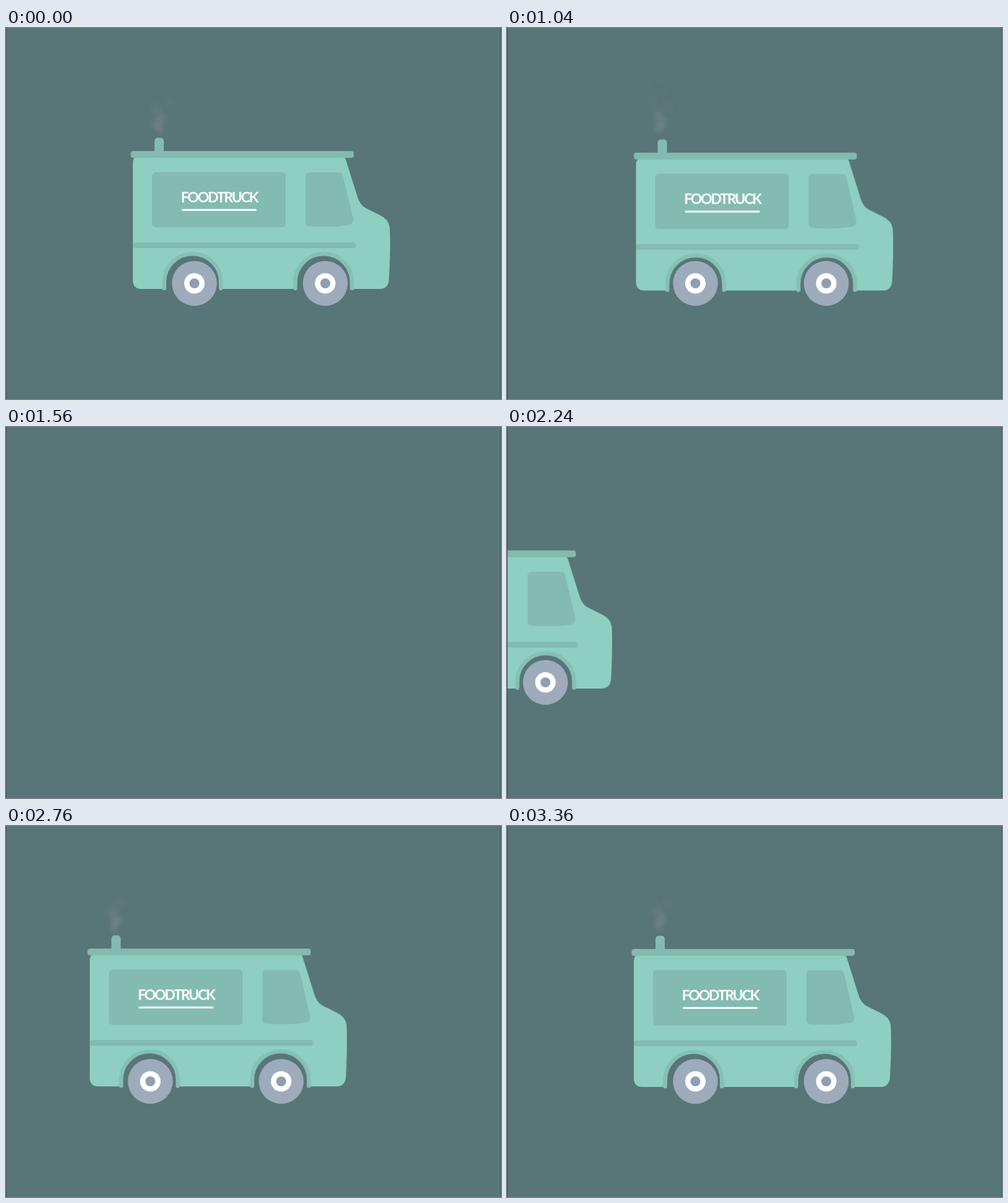
Animation, 800 px wide and 600 px high, one loop 3.4 s. Source, as an HTML page:

```html
<!DOCTYPE html>
<html lang="en">
<head>
<meta charset="utf-8">
<title>Food truck</title>
<style>
  :root { --bg: #587577; --body: #8ecfc2; --trim: #83bbb0; --fender: #86c0b4; --wheel: #9dabba; }
  html, body { margin: 0; width: 100%; height: 100%; overflow: hidden; background: var(--bg); }
  svg { display: block; width: 800px; height: 600px; }

  .truck, .sway, .bounce { animation: drive 3400ms infinite linear; }
  .sway { animation-name: sway; animation-timing-function: ease-in-out; }
  .bounce { animation-name: bounce; animation-timing-function: ease-in-out; }

  /* Waits, leaves to the right, re-enters from the left and coasts to a stop */
  @keyframes drive {
    0%, 32.235% { transform: translateX(0); animation-timing-function: ease; }
    48.265% { transform: translateX(612px); animation-timing-function: step-end; }
    55% { transform: translateX(-640px); animation-timing-function: step-end; }
    62.353% { transform: translateX(-625px); animation-timing-function: cubic-bezier(.215, .63, .37, 1); }
    98.824%, 100% { transform: translateX(0); }
  }
  @keyframes sway {
    0% { transform: translateX(0); }
    18.824% { transform: translateX(5px); }
    36.471% { transform: translateX(3px); }
    71.765% { transform: translateX(3.2px); }
    81.176% { transform: translateX(1.6px); }
    98.824%, 100% { transform: translateX(0); }
  }
  @keyframes bounce {
    0% { transform: translateY(0); }
    4% { transform: translateY(-1.2px); }
    12% { transform: translateY(3.8px); }
    18.824% { transform: translateY(3px); }
    25% { transform: translateY(-.5px); }
    31% { transform: translateY(2.6px); }
    36.471% { transform: translateY(-.7px); }
    44% { transform: translateY(2.5px); }
    63% { transform: translateY(0); }
    71.765% { transform: translateY(2.5px); }
    81.176% { transform: translateY(-.8px); }
    88% { transform: translateY(2.5px); }
    95.5% { transform: translateY(-.8px); }
    98.824%, 100% { transform: translateY(0); }
  }

  .puff { fill: url(#smoke); animation: rise 1133.333ms infinite linear; }
  @keyframes rise {
    0% { transform: translate(0, 172px) scale(.7); opacity: 0; }
    12% { transform: translate(calc(var(--drift) * .08), 161px) scale(.95); opacity: .3; }
    35% { transform: translate(calc(var(--drift) * .3), 140px) scale(1.15); opacity: .13; }
    60% { transform: translate(calc(var(--drift) * .6), 115px) scale(1.35); opacity: .04; }
    100% { transform: translate(var(--drift), 76px) scale(1.5); opacity: 0; }
  }

  .name { font: 700 23px Lato, "Open Sans", sans-serif; letter-spacing: -2.2px; fill: #fff; }
</style>
</head>
<body>
<svg viewBox="0 0 800 600">
  <defs>
    <radialGradient id="smoke">
      <stop offset="0" stop-color="#a39da5"/>
      <stop offset=".45" stop-color="#a39da5" stop-opacity=".6"/>
      <stop offset="1" stop-color="#a39da5" stop-opacity="0"/>
    </radialGradient>
    <g id="arch">
      <path d="M-43 424V0A43 43 0 0 1 43 0V424Z" transform="translate(0 411)" fill="none"/>
      <path d="M-45.8 426V411A45.8 45.8 0 0 1 45.8 411V426Z" fill="var(--bg)"/>
      <path d="M-45.8 421V411A45.8 45.8 0 0 1 45.8 411V421" fill="none" stroke="var(--fender)" stroke-width="6.6" stroke-linecap="round"/>
    </g>
    <g id="wheel">
      <circle r="36.3" fill="var(--wheel)"/>
      <circle r="16.6" fill="#fff"/>
      <circle r="8" fill="#8f9eb0"/>
    </g>
  </defs>

  <g class="truck">
    <g id="puffs" transform="translate(247.5 0)"></g>
    <g class="sway"><g class="bounce">
      <rect x="240" y="177.5" width="15" height="30" rx="5" fill="var(--trim)"/>
      <path fill="var(--body)" d="M211 208H545Q548 209 549.500 214L568 273Q572 286 581 291L604 302.500Q618 309 620 322Q622 347 619 406Q618 422 604 422H219Q205 422 205 408V217Q205 211 211 208Z"/>
      <rect x="201.500" y="199" width="360.500" height="11" rx="4" fill="var(--trim)"/>
      <rect x="236" y="233" width="216" height="89.500" rx="6" fill="var(--trim)"/>
      <path fill="var(--trim)" d="M490 233.500H538Q543.500 234 545 240L561 308Q562 316 555 318.500Q530 323 490 320.500Q484 320 484 314V240Q484 233.500 490 233.500Z"/>
      <rect x="205" y="347" width="360.500" height="9" rx="4" fill="var(--trim)"/>
      <use href="#arch" x="301.500"/>
      <use href="#arch" x="513.300"/>
      <text class="name" x="344.500" y="282.300" text-anchor="middle">FOODTRUCK</text>
      <rect x="284" y="292.700" width="121" height="3" rx="1.500" fill="#fff"/>
    </g></g>
    <use href="#wheel" x="304.500" y="413"/>
    <use href="#wheel" x="516" y="413"/>
  </g>

  <rect width="1" height="600" fill="#3d5254"/>
  <rect x="799" width="1" height="600" fill="#465d5f"/>
</svg>
<script>
  const puffs = document.getElementById("puffs");
  const count = 11;
  for (let i = 0; i < count; i++) {
    const puff = document.createElementNS("http://www.w3.org/2000/svg", "circle");
    puff.setAttribute("class", "puff");
    puff.setAttribute("r", 13);
    puff.style.setProperty("--drift", 28 * Math.sin(i * 2.4) + "px");
    puff.style.animationDelay = -1133.333 * i / count + "ms";
    puffs.append(puff);
  }
</script>
</body>
</html>
```
